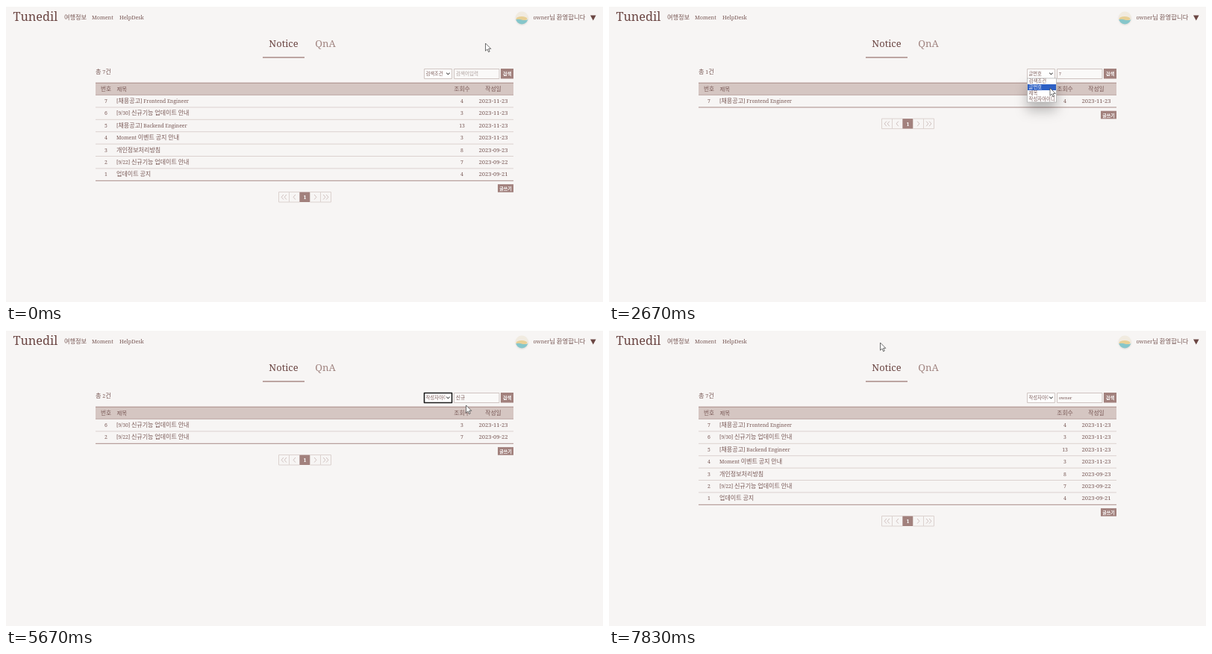
An HTML page that plays this animation: 800 by 397 pixels, repeating every 7910 ms.

```html
<!DOCTYPE html>
<html lang="ko">
<head>
<meta charset="utf-8">
<title>Notice board search</title>
<style>
  html, body { margin: 0; width: 100%; height: 100%; overflow: hidden; background: #f7f5f4; }
  svg { display: block; width: 100%; height: 100%; }
  text { font-family: 'Noto Serif', 'Noto Sans CJK KR', 'Noto Sans CJK', serif; fill: #7a5a57; white-space: pre; }
  tspan { font-weight: 300; }
  .white, .white tspan { fill: #fff; font-weight: 700; }
  .line { stroke: #a98b87; fill: none; }
  .soft { stroke: #dcd2cf; fill: none; }
  .chevron { stroke: #c4b4b1; fill: none; stroke-width: .8; }
  .brown { fill: #a2817d; }
  .box { fill: #fff; stroke: #cfc4c1; }
  .pointer { fill: #fff; stroke: #4a4a4a; stroke-width: .8; stroke-linejoin: round; }
  #list { filter: drop-shadow(0 11px 8px rgba(0, 0, 0, .25)); }
</style>
</head>
<body>
<svg id="stage" viewBox="0 0 800 397">
  <defs>
    <clipPath id="labelClip"><path d="M561 85H588.5V97H561Z"/></clipPath>
    <clipPath id="avatarClip"><circle cx="691.3" cy="16" r="8.4"/></clipPath>
    <filter id="blur" x="-50%" y="-50%" width="200%" height="200%"><feGaussianBlur stdDeviation="1.3"/></filter>
  </defs>
  <path d="M0 .5H800" stroke="#fff"/>
  <g id="header"></g>
  <circle cx="691.3" cy="17.3" r="8.2" fill="#dcd6d2" filter="url(#blur)"/>
  <g clip-path="url(#avatarClip)">
    <path d="M682 7h19v19h-19z" fill="#f1ebe0"/>
    <ellipse cx="691" cy="17" rx="7.5" ry="3" fill="#e8d096"/>
    <path d="M682 18.5q5-1.5 9 0t10-1v10h-19z" fill="#86c6ca"/>
  </g>
  <path d="M783 12.5H790.6L786.8 19.5Z" fill="#6b4643"/>
  <path d="M344 69H400" class="line" stroke-width="1.4"/>
  <g id="total"></g>
  <g id="table"></g>
  <path id="select" class="box" d="M560.5 84.5H597.5V97.5H560.5Z"/>
  <g id="label" clip-path="url(#labelClip)"></g>
  <path d="M590.2 89.6l2.2 2.2 2.2-2.2" fill="none" stroke="#555" stroke-width="1.1"/>
  <path d="M600.5 84.5H661V97.5H600.5Z" class="box" style="fill:#faf9f8"/>
  <g id="field"></g>
  <path id="caret" d="M0 87.5V95" stroke="#333" stroke-width=".8"/>
  <path d="M663 84H680V97.5H663Z" class="brown"/>
  <g id="search"></g>
  <g id="list"></g>
  <g id="cursor">
    <path id="arrow" class="pointer" d="M0 0V10.2L2.4 8 4.1 11.7 5.7 11 4.1 7.4H7.3Z"/>
    <path id="hand" class="pointer" d="M-1 .6Q0-.7 1 .6V4.4Q2.6 3.6 3.3 5 4.9 4.2 5.6 5.6 7.4 5.2 7.6 6.8V9.4L6 12.6H.4L-3 8Q-3.2 6.2-1 7.6Z"/>
    <path id="beam" d="M-3-5H-.8Q0-5 0-4.3 0-5 .8-5H3M0-4.3V4.3M-3 5H-.8Q0 5 0 4.3 0 5 .8 5H3" fill="none" stroke="#222" stroke-width="1.4"/>
  </g>
</svg>
<script>
const LOOP = 7910, STEP = 1000 / 12;
const $ = id => document.getElementById(id);

// Hangul is set a little larger than the Latin beside it.
function text(x, y, str, size, extra = '') {
  const body = str.replace(/[가-힣ㄱ-ㅎ]+/g, run => `<tspan font-size="${size}">${run}</tspan>`);
  return `<text x="${x}" y="${y}" font-size="${size * .84}" ${extra}>${body}</text>`;
}
const mid = 'text-anchor="middle"';
const line = (y, kind, x1 = 120, x2 = 680) => `<path class="${kind}" d="M${x1} ${y}H${x2}"/>`;

const posts = [
  [7, '[채용공고] Frontend Engineer', 4, '2023-11-23'],
  [6, '[9/30] 신규기능 업데이트 안내', 3, '2023-11-23'],
  [5, '[채용공고] Backend Engineer', 13, '2023-11-23'],
  [4, 'Moment 이벤트 공지 안내', 3, '2023-11-23'],
  [3, '개인정보처리방침', 8, '2023-09-23'],
  [2, '[9/22] 신규기능 업데이트 안내', 7, '2023-09-22'],
  [1, '업데이트 공지', 4, '2023-09-21']
];
const filters = {
  all: () => true,
  number: post => post[0] === 7,
  title: post => post[1].includes('신규')
};
const options = ['검색조건', '글번호', '제목', '작성자아이디'];

$('header').innerHTML =
  text(9.5, 20.3, 'Tunedil', 19.4, 'style="fill:#6b4643"') +
  text(78, 18.3, '여행정보', 8.2) + text(115, 18.3, 'Moment', 8.6) + text(152, 18.3, 'HelpDesk', 8.6) +
  text(706.5, 18.3, 'owner님 환영합니다', 8.4) +
  text(372, 55, 'Notice', 15.4, mid + ' style="fill:#6b4643"') +
  text(428, 55, 'QnA', 15.7, mid + ' style="fill:#a18581"');
$('search').innerHTML = text(671.5, 93, '검색', 6.2, mid + ' class="white"');

function pager(y) {
  let out = '';
  for (let i = 0; i < 5; i++) {
    const x = 365.5 + i * 14;
    out += `<path class="${i === 2 ? 'brown' : 'soft'}" d="M${x} ${y}h14v13.5h-14z"/>`;
    if (i === 2) {
      out += text(x + 7, y + 9.5, '1', 8.4, mid + ' class="white"');
      continue;
    }
    const dir = i < 2 ? -1 : 1;
    for (const shift of i % 4 ? [0] : [-2, 2])
      out += `<path class="chevron" d="M${x + 7 + shift - dir * 1.4} ${y + 3.5}l${dir * 2.8} 3.3l${-dir * 2.8} 3.3"/>`;
  }
  return out;
}

function drawTable(filter) {
  const shown = posts.filter(filters[filter]);
  const rowH = 16.4, top = 119.5, bottom = top + shown.length * rowH;
  let out = '<path fill="#d5c6c2" d="M120 103H680V119.5H120Z"/>' + line(103.2, 'line') +
    `<g opacity=".6">${line(119.3, 'line')}</g>` +
    text(134, 113.8, '번호', 7.6, mid) + text(148.5, 113.8, '제목', 7.4) +
    text(611, 113.8, '조회수', 7.8, mid) + text(653, 113.8, '작성일', 7.8, mid);
  shown.forEach(([no, title, views, date], i) => {
    const y = top + i * rowH + 10.4;
    out += text(134, y, `${no}`, 8.2, mid) + text(148, y, title, 8.05) +
      text(611, y, `${views}`, 8.2, mid) + text(653, y, date, 9.1, mid);
    if (i) out += line(top + i * rowH, 'soft');
  });
  out += line(bottom, 'line') +
    `<path class="brown" d="M659 ${bottom + 4.8}h21v10.7h-21z"/>` +
    text(669.5, bottom + 12.6, '글쓰기', 6, mid + ' class="white"') + pager(bottom + 15.2);
  $('table').innerHTML = out;
  $('total').innerHTML = text(120, 90.5, `총 ${shown.length}건`, 8.2);
}

function drawList(hot) {
  let out = '<path d="M560.5 97H599.5V129H560.5Z" fill="#fff" stroke="#aaa" stroke-width=".7"/>';
  options.forEach((name, i) => {
    const y = 97 + i * 8;
    if (i === hot) out += `<path d="M561 ${y}h38v8h-38z" fill="#2d5fc4"/>`;
    out += text(562.5, y + 6, name, 6.4, i === hot ? 'style="fill:#fff"' : '');
  });
  $('list').innerHTML = out;
}

// Each entry changes only the parts it names.
const events = [
  [0, { option: 0, value: '', filter: 'all', hot: -1, ring: false, caret: false }],
  [410, { hot: 0 }],
  [660, { hot: 1 }],
  [825, { hot: -1, option: 1 }],
  [1160, { caret: true }],
  [1325, { value: '7' }],
  [1660, { caret: false }],
  [2075, { filter: 'number' }],
  [2575, { hot: 1 }],
  [2825, { hot: 2 }],
  [2990, { hot: -1, option: 2 }],
  [3575, { caret: true }],
  [3660, { value: '' }],
  [3740, { value: 'ㅅ' }],
  [3825, { value: '시' }],
  [3910, { value: '신' }],
  [3990, { value: '신ㄱ' }],
  [4075, { value: '신규' }],
  [4240, { filter: 'title' }],
  [4745, { caret: false }],
  [5160, { hot: 2 }],
  [5410, { hot: 3 }],
  [5575, { hot: -1, option: 3, ring: true }],
  [5910, { ring: false, caret: true }],
  [5990, { value: '' }],
  [6075, { value: 'o' }],
  [6160, { value: 'ow' }],
  [6240, { value: 'own' }],
  [6325, { value: 'owne' }],
  [6410, { value: 'owner' }],
  [6495, { caret: false }],
  [6990, { filter: 'all' }]
];

// Pointer stops: time, x, y.
const stops = [
  [0, 642.5, 50], [330, 591, 92], [500, 591, 92], [670, 588, 109], [830, 588, 109],
  [1170, 630, 92], [1590, 630, 92], [1910, 677.7, 91.2], [2080, 677.7, 91.2], [2500, 592, 92],
  [2660, 591, 110], [2830, 588, 117], [3000, 588, 117], [3250, 592, 100], [3580, 633.5, 92],
  [4830, 633.5, 92], [5080, 592, 92], [5250, 592, 92], [5420, 588, 124], [5580, 592, 123],
  [5660, 616.5, 101], [5920, 640, 92], [6580, 640, 92], [6660, 651.5, 93.5],
  [6830, 672, 92], [7250, 672, 92], [7830, 363.5, 17], [LOOP, 363.5, 17]
];

function pointerAt(t) {
  const i = Math.max(1, stops.findIndex(stop => stop[0] > t));
  const [t0, x0, y0] = stops[i - 1], [t1, x1, y1] = stops[i];
  const k = (t - t0) / (t1 - t0), ease = k * k * (3 - 2 * k);
  return [x0 + (x1 - x0) * ease, y0 + (y1 - y0) * ease];
}

const show = (id, on) => { $(id).style.display = on ? '' : 'none'; };
let drawn = {};

function render(t) {
  const state = {};
  for (const [at, change] of events) if (at <= t) Object.assign(state, change);

  if (state.filter !== drawn.filter) drawTable(state.filter);
  if (state.option !== drawn.option) $('label').innerHTML = text(562.5, 92.8, options[state.option], 6.3);
  if (state.hot !== drawn.hot) drawList(state.hot);
  if (state.value !== drawn.value) {
    $('field').innerHTML = state.value
      ? text(602.8, 92.8, state.value, 6.8)
      : text(603, 92.8, '검색어입력', 6.5, 'style="fill:#aea19e"');
  }
  show('list', state.hot >= 0);
  show('caret', state.caret);
  const width = state.value ? $('field').firstChild.getComputedTextLength() : 0;
  $('caret').setAttribute('transform', `translate(${603.2 + width})`);
  $('select').style.cssText = state.ring ? 'stroke:#1b1b1b;stroke-width:1.6;stroke-linejoin:round' : '';

  const [x, y] = pointerAt(t);
  const inBar = y > 84 && y < 97.5 && state.hot < 0;
  const kind = inBar && x > 663 && x < 680 ? 'hand' : inBar && x > 600 && x < 661 ? 'beam' : 'arrow';
  for (const id of ['arrow', 'hand', 'beam']) show(id, id === kind);
  $('cursor').setAttribute('transform', `translate(${x} ${y})`);
  drawn = state;
}

const start = performance.now();
function tick() {
  const t = (performance.now() - start) % LOOP;
  render(Math.floor((t + 4) / STEP) * STEP);
  requestAnimationFrame(tick);
}
tick();
</script>
</body>
</html>
```
